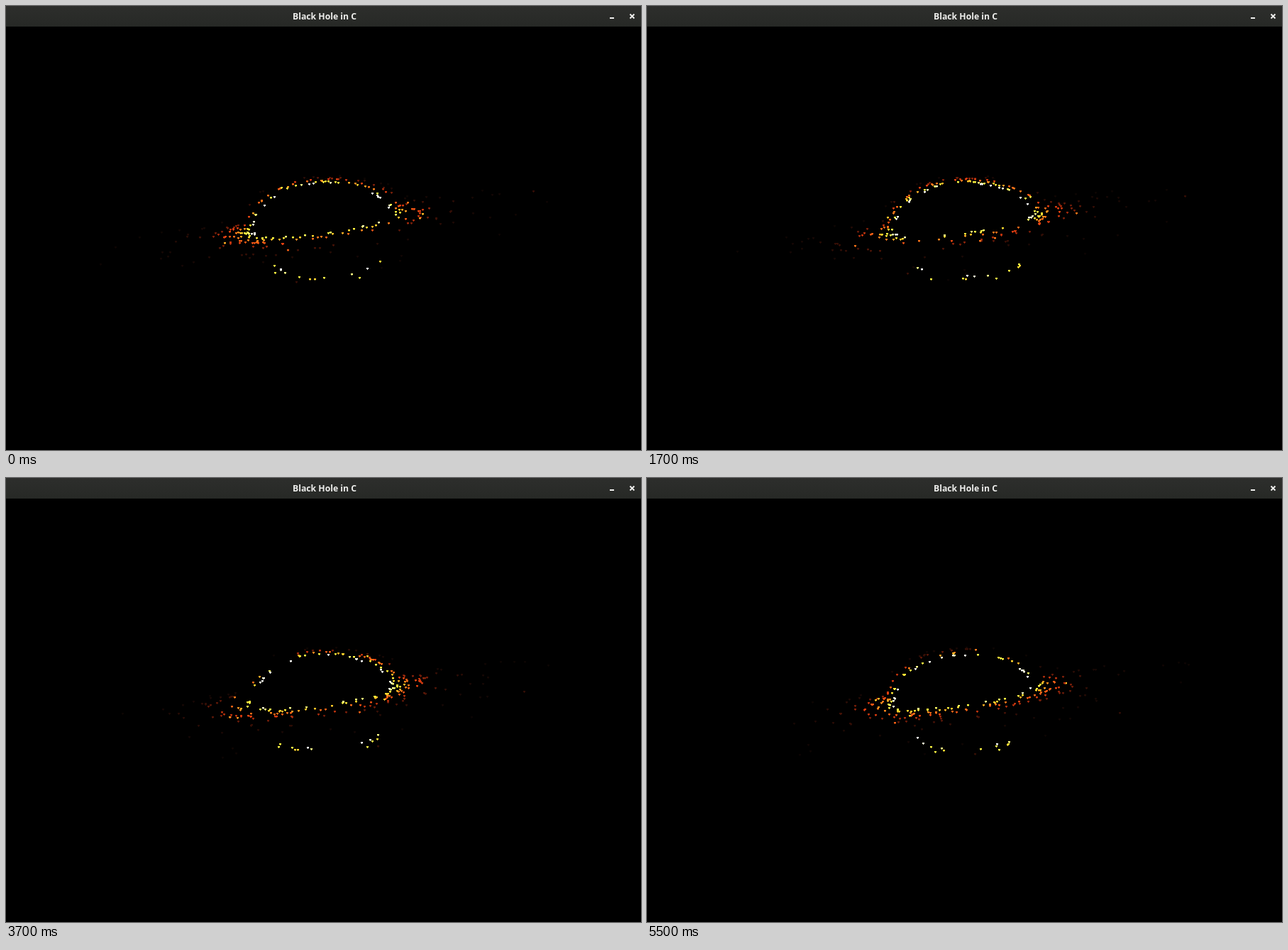
Write an HTML page with a canvas that moves like this. It is 895 by 626 pixels and loops after 5.6 s.

```html
<!DOCTYPE html>
<html lang="en">
<head>
<meta charset="utf-8">
<title>Black Hole in C</title>
<style>
  html, body { margin: 0; width: 100%; height: 100%; overflow: hidden; background: #000; }
  canvas, svg { position: absolute; left: 0; top: 0; display: block; }
  text { font: 700 12.2px "Noto Sans", "Open Sans", sans-serif; fill: #eeeeec; }
</style>
</head>
<body>
<canvas id="space" width="895" height="626"></canvas>
<svg width="895" height="29" viewBox="0 0 895 29">
  <defs>
    <linearGradient id="bar" x2="0" y2="1">
      <stop stop-color="#2d2e2c"/>
      <stop offset="1" stop-color="#272926"/>
    </linearGradient>
  </defs>
  <rect width="895" height="29" fill="url(#bar)"/>
  <text x="449" y="19" text-anchor="middle">Black Hole in C</text>
  <rect x="851" y="16" width="6" height="2" fill="#eeeeec"/>
  <path d="M879.5 11.5l6 6m0-6l-6 6" stroke="#eeeeec" stroke-width="1.9"/>
</svg>
<script>
const LOOP = 5600, STEP = 100;
const CX = 445, CY = 307, INNER = 95, SHEAR = 0.13;
const ctx = document.getElementById('space').getContext('2d');

let seed = 20417;
function random() {
  seed = (seed * 1664525 + 1013904223) >>> 0;
  return seed / 4294967296;
}
const spread = mean => -Math.log(1 - random()) * mean;

// Disc temperature by radius: [radius, r, g, b]
const ramp = [
  [95, 255, 255, 255], [100, 255, 255, 205], [105, 255, 255, 70],
  [114, 255, 205, 40], [122, 255, 120, 25], [138, 220, 60, 15],
  [154, 120, 30, 9], [178, 54, 14, 5], [220, 22, 7, 4], [340, 10, 4, 3]
];

function heat(radius) {
  const i = Math.max(1, ramp.findIndex(stop => stop[0] >= radius));
  const [a, b] = [ramp[i - 1], ramp[i]];
  const k = (radius - a[0]) / (b[0] - a[0]);
  const rgb = [1, 2, 3].map(c => Math.round(a[c] + (b[c] - a[c]) * k));
  return `rgb(${rgb})`;
}

function particle(mean, under) {
  const r = Math.min(INNER + spread(mean), 320);
  const glow = random() < 0.05 ? INNER + (r - INNER) * 0.4 : r;
  return { r, glow, under, angle: random() * Math.PI * 2,
           speed: 0.12 * (INNER / r) ** 1.5 };
}

const particles = [
  ...Array.from({ length: 270 }, () => particle(58, false)),
  ...Array.from({ length: 14 }, () => particle(18, true))
].sort((a, b) => b.r - a.r);

// Far half of the disc is bent up over the shadow.
function discPoint(r, angle) {
  const x = r * Math.cos(angle), depth = Math.sin(angle);
  if (depth >= 0) {
    const drop = (13 + (r - INNER) * 0.28) * depth;
    return [CX + x, CY + drop - SHEAR * x];
  }
  const extra = 1 - Math.exp((INNER - r) / 60);
  const width = INNER + 2 + 18 * extra;
  const arch = Math.sqrt(Math.max(0, 1 - (x / width) ** 2));
  const rise = -depth * (13 + 12 * extra) + 44 * arch;
  return [CX + x, CY - rise - SHEAR * x * (1 - 0.8 * arch)];
}

// Secondary image: the underside, bent below the shadow.
function underPoint(r, angle) {
  const a = angle % Math.PI;
  const x = (72 + (r - INNER) * 0.2) * Math.cos(a);
  const height = 73 + Math.min(10, (r - INNER) * 0.3);
  return [452 + x, CY + height * (0.72 + 0.28 * Math.sin(a)) - 0.04 * x];
}

function dot(x, y) {
  x = Math.round(x);
  y = Math.round(y);
  ctx.fillRect(x - 1, y - 1, 3, 2);
  ctx.fillRect(x, y + 1, 1, 1);
}

function draw(step) {
  ctx.fillStyle = '#000';
  ctx.fillRect(0, 0, 895, 626);
  for (const p of particles) {
    const angle = p.angle + p.speed * step;
    const near = p.under ? 0 : Math.max(0, Math.sin(angle));
    ctx.fillStyle = heat(p.glow + 8 * near);
    dot(...(p.under ? underPoint : discPoint)(p.r, angle));
  }
}

const start = performance.now();
let shown = -1;
function tick() {
  const step = Math.floor(((performance.now() - start) % LOOP) / STEP);
  if (step !== shown) draw(shown = step);
  requestAnimationFrame(tick);
}
tick();
</script>
</body>
</html>
```
